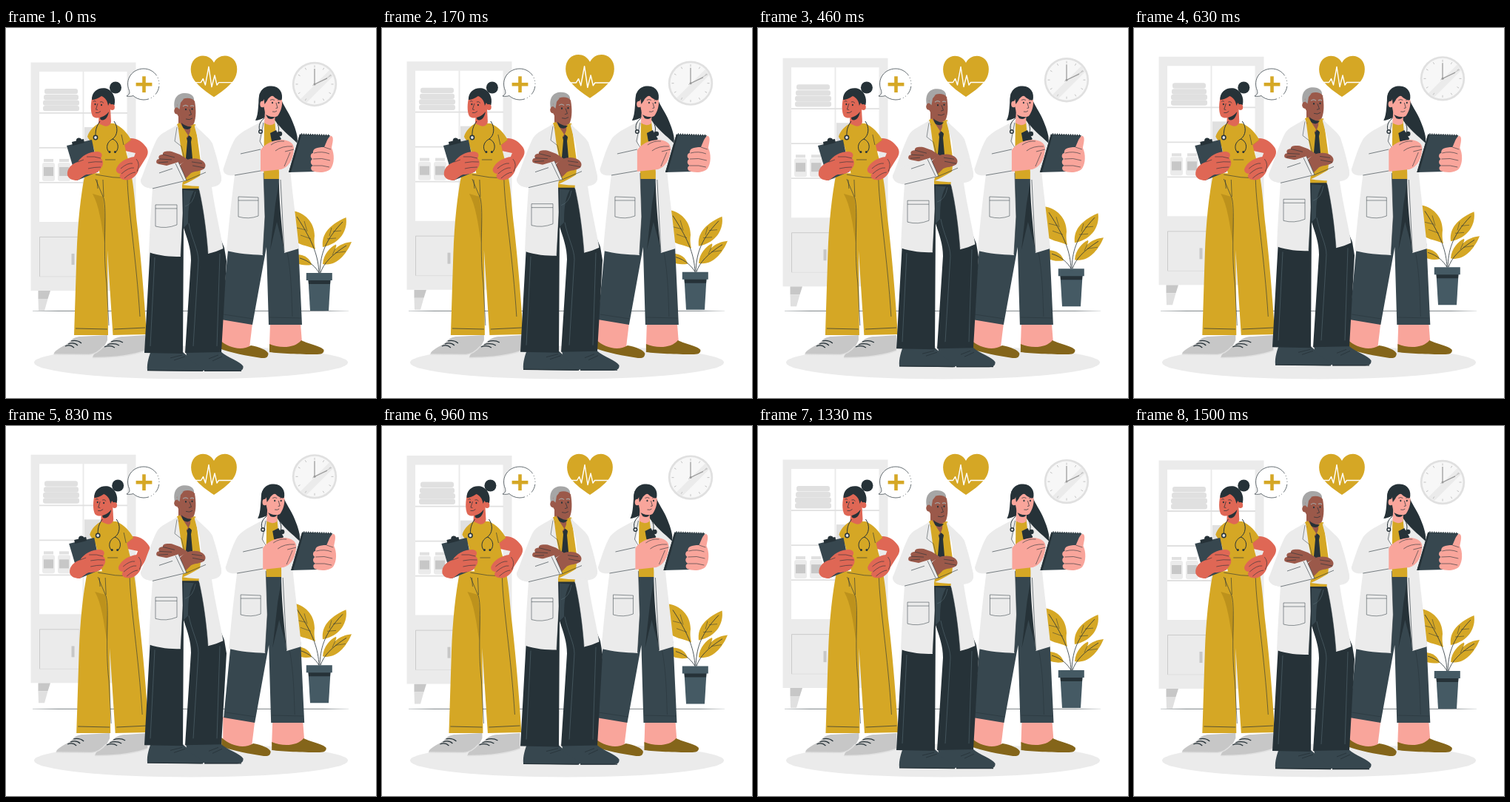
Write an HTML page with a canvas that moves like this. It is 500 px wide and 500 px high and loops after 1.54 s.

```html
<!DOCTYPE html>
<html lang="en">
<head>
<meta charset="utf-8">
<title>Medical team</title>
<style>
html, body { margin: 0; width: 100%; height: 100%; overflow: hidden; background: #fff; }
canvas { display: block; width: 100vw; height: 100vh; }
</style>
</head>
<body>
<canvas id="stage"></canvas>
<script>
const canvas = document.getElementById('stage');
const ctx = canvas.getContext('2d');
const ratio = Math.max(1, window.devicePixelRatio || 1);
canvas.width = canvas.height = 500 * ratio;

const LOOP = 1540, STEPS = 37;
const INK = '#263238', SLATE = '#37474f', STEEL = '#455a64';
const GOLD = '#d5a725', AMBER = '#bd921c', BROWN = '#84651a';
const PALE = '#ebebeb', MIST = '#e0e0e0', GREY = '#c7c7c7', WHITE = '#fff';
const CORAL = '#df6755', CLAY = '#9b594a', PINK = '#f9a59b', SILVER = '#a6a6a6';

function fill(color, d) {
  ctx.fillStyle = color;
  ctx.fill(new Path2D(d));
}
function line(d, width = 0.8, color = INK) {
  ctx.strokeStyle = color;
  ctx.lineWidth = width;
  ctx.stroke(new Path2D(d));
}
function box(color, x, y, w, h, r = 0) {
  ctx.fillStyle = color;
  ctx.beginPath();
  ctx.roundRect(x, y, w, h, r);
  ctx.fill();
}
function oval(color, x, y, rx, ry = rx) {
  ctx.fillStyle = color;
  ctx.beginPath();
  ctx.ellipse(x, y, rx, ry, 0, 0, 7);
  ctx.fill();
}
function shifted(dx, dy, draw) {
  ctx.save();
  ctx.translate(dx, dy);
  draw();
  ctx.restore();
}

// Timing
function snappy(x) {
  let lo = 0, hi = 1;
  const curve = (s, a, b) => 3 * (1 - s) ** 2 * s * a + 3 * (1 - s) * s * s * b + s ** 3;
  for (let i = 0; i < 18; i++) {
    const mid = (lo + hi) / 2;
    if (curve(mid, 0.36, 0.19) < x) lo = mid; else hi = mid;
  }
  return curve(lo, 0.07, 0.97);
}
function shake(p) {
  const stops = [0, -1, 2, -4, 4, -4, 4, -4, 2, -1, 0, 0];
  const i = Math.min(9, Math.floor(p * 10));
  return 0.85 * (stops[i] + (stops[i + 1] - stops[i]) * snappy(p * 10 - i));
}
const beat = p => 1 + 0.07 * Math.max(0, 1 - Math.abs(p / 0.15 - 1));
const float = p => 4 * (Math.cos(p * 2 * Math.PI) - 1);

function floor() {
  oval(PALE, 250, 452, 212, 22.5);
  const fade = ctx.createLinearGradient(36, 0, 463, 0);
  fade.addColorStop(0, '#26323866');
  fade.addColorStop(0.08, INK);
  fade.addColorStop(0.92, INK);
  fade.addColorStop(1, '#26323833');
  line('M36 382.4H463', 0.6, fade);
}

function cabinet() {
  fill(GREY, 'M43.5 355H60L56.5 366H43.5Z');
  fill(MIST, 'M43.5 366H56.5L52 382H44Z');
  box(PALE, 33.5, 46.5, 142, 308.5);
  box(WHITE, 45, 59, 58.5, 203);
  box(WHITE, 105.5, 59, 58, 203);
  for (const y of [115, 162, 209]) line(`M45 ${y}H164`, 1.8, MIST);
  [[52, 82, 45], [51, 90, 47], [50, 97.5, 49], [50, 105, 49]].forEach(([x, y, w]) => box(MIST, x, y, w, 7.4, 3));
  box(MIST, 106, 134, 23, 27);
  for (const x of [49, 70]) {
    box(MIST, x + 2, 177, 13, 4);
    box(PALE, x, 182, 17, 25, 3);
    box(GREY, x + 2, 188, 13, 12);
  }
  line('M45.5 336V282.5H99', 0.7, '#bdbdbd');
  line('M45.5 336H99V282.5', 0.7, '#d8d8d8');
  box(GREY, 88.5, 305, 4, 15);
}

function clock() {
  const x = 417, y = 76;
  oval(MIST, x, y, 30.2);
  oval('#f7f7f7', x, y, 27.5);
  fill(PALE, 'M398 96L437 57L442 65L406 101Z');
  ctx.strokeStyle = '#bdbdbd';
  ctx.lineWidth = 0.9;
  for (let i = 0; i < 12; i++) {
    const c = Math.cos(i * Math.PI / 6), s = Math.sin(i * Math.PI / 6);
    ctx.beginPath();
    ctx.moveTo(x + 22.5 * c, y + 22.5 * s);
    ctx.lineTo(x + 25.5 * c, y + 25.5 * s);
    ctx.stroke();
  }
  line('M417 76V55M417 76L434 68', 1.1, '#8f8f8f');
  line('M414 78L440 64', 0.6, '#aaa');
  oval('#999', x, y, 1.5);
}

function plant() {
  fill(GOLD, 'M428 296C426 281 434 267 459.5 256C462 272 453 291 428 296Z');
  fill(GOLD, 'M428 319C429 306 438 296 446 292.5C447 295 446 297 443.5 300C451 292 459 290 467 289C461 304 447 323 428 319Z');
  fill(GOLD, 'M387 247C403 249 417 262 417 281C416 289 417 294 418 299C405 293 395 294 388 285Z');
  fill(GOLD, 'M392 306C404 306 411 312 413 320C406 321 398 321 392 317Z');
  line('M423 331C422 310 416 290 393 255M424 331C425 310 428 290 455 262M425 331C429 318 441 306 460 294M423 331C419 324 411 315 397 311', 0.8);
  line('M407 275L403 261M412 285L398 280M405 273L393 270M437 281L440 270M442 275L453 274M434 285L446 284M445 304L459 302M441 307L445 298', 0.5);
  fill(STEEL, 'M408.5 340H438.5L436 382H411Z');
  fill(INK, 'M408.5 340H438.5L438 346H409Z');
  box(STEEL, 405.8, 331, 35, 10);
}

function heart(scale) {
  ctx.save();
  ctx.translate(281, 66);
  ctx.scale(scale, scale);
  ctx.translate(-281, -66);
  fill(GOLD, 'M281 47C275 36 262 35.5 255 42.5C248.5 49 248.5 62 255 71C262 80 272 87 281 93C290 87 300 80 307 71C313.5 62 313.5 49 307 42.5C300 35.5 287 36 281 47Z');
  line('M254 73.5H263.5L266.5 68.5L269.5 77L274 52.5L278 79.5L282 64L285 77L287.5 73.5H306', 1.4, WHITE);
  ctx.restore();
}

function bubble() {
  const shape = 'M163 92C168 89 167 87 166.5 84.5C160 69 171 55 186 55C198 55 207 64.5 207 76C207 87.5 198 97 186 97C180 97 175 94.5 172 91.5C169 92.5 166 92.5 163 92Z';
  fill(WHITE, shape);
  ctx.setLineDash([72, 3, 1, 3, 1, 3, 1, 3, 12, 3, 1, 3, 1, 3, 50, 0]);
  line(shape, 0.7);
  ctx.setLineDash([]);
  box(GOLD, 184.2, 65.3, 4.6, 21.8);
  box(GOLD, 175.6, 73.9, 21.8, 4.6);
}

function nurse() {
  // Shoes
  fill(GREY, 'M64.5 441C65 435 77 431 85 425C90 419 95 417 101 417L137 415L137 422C132 433 126 440 112 441.5Z');
  fill(GREY, 'M117 445C118 438 131 432 140 425C147 418 153 417 159 417L188 415L188 436C176 441 150 446 117 445.5Z');
  line('M64.5 441L112 441.5C121 441 127 436 132 430M117 445.5C150 446 176 441 188 436', 1.4, MIST);
  line('M84 427Q92 424 97 429M88 423Q96 421 102 426M80 430Q87 427 92 432M137 428Q146 425 153 429M142 424Q151 421 158 425M133 431Q141 428 147 432', 1.2);

  // Trousers
  fill(GOLD, 'M107 196C101 225 97 262 95.5 305L92 415L138 415L137 300L144.5 415L190 414C187 365 182 305 176.5 260C174 235 173 215 169 197Z');
  fill(AMBER, 'M117 224L131 228C134 250 135 270 133 290C129 265 126 240 117 224Z');
  line('M121 204L132 230C137 250 130 295 136 345L139 402M132 228L131 205M123 205L124 217M164 205C165 245 176 310 181 390', 0.6);
  line('M94 406L137 407M146 407L188 405', 0.7);

  // Resting arm
  fill(CORAL, 'M158 152C170 146 180 150 187 158C192 163 193 168 190 174L180 190L168 187L175 169L161 166Z');

  // Tunic
  fill(GOLD, 'M127 128C119 132 112 139 110 147L118 160L127 198L169 201C170 190 165 180 162 166L160 158L169 151C164 142 157 134 146 129Z');
  line('M159 158L156 144M121 198Q144 203 168 203M134 178H148', 0.6);
  line('M169 151L160 158', 0.6, AMBER);

  // Head
  fill(CORAL, 'M126 112L141 108L142 126C142 131 137 134 132 132L125 129Z');
  fill(INK, 'M126 119C131 121 135 118 139 113C138 120 134 126 128 124Z');
  oval(INK, 148, 80.5, 8);
  fill(CORAL, 'M117 92C114 102 114 113 117 119C122 124 130 121 134 117C139 112 143 105 143 96C138 88 124 86 117 92Z');
  fill(INK, 'M116 97C115.5 86 125 79.5 135 81.5C144 84 149 94 146.5 104L143 105L140 101L138 105C137 98 134 94 129 92C124 95.5 120 97 116 97Z');
  oval(CORAL, 143.5, 107, 3.4, 4);
  oval(INK, 120.5, 103, 1, 1.3);
  oval(INK, 129, 104, 1, 1.3);
  line('M118 99.5Q119.5 97.5 121.5 99.5M127 100Q130 98.5 132 101.5M124 102L121.5 110L124 110.5M121 114.5Q125 115.5 128 112.5', 0.7);

  // Stethoscope
  line('M127 126C122 133 121 138 121 145M146 126C152 134 151 145 144 150C136 154 135 162 138.5 167M144 150C152 153 153 162 149 167', 1);
  oval(INK, 121, 148, 3.4);
  oval(MIST, 121, 148, 1.9);
  oval(INK, 140, 167.5, 1.5);
  oval(INK, 147.5, 167.5, 1.5);

  // Hand on hip
  fill(CORAL, 'M149 190C153 181 163 175 174 174C181 179 182 187 178 195C174 202 167 207 159 205C154 204 152 200 155 197C151 197 148 194 149 190Z');
  line('M155 190Q164 182 171 183M156 197Q166 188 173 189M160 203Q169 195 175 195M176 177Q182 184 177 194', 0.6);

  // Clipboard
  fill(SLATE, 'M82 159L116 151L125 194L96 206Z');
  fill(INK, 'M90 159L89 154L95 152.5C94 148 101 147 102 150.5L105 150L106 155Z');
  fill(CORAL, 'M83 199C82 190 88 184 97 181C102 173 112 167 124 167C130 168 131 172 128 176C132 179 132 185 128 190C125 196 117 198 109 198C103 200 101 204 96 206C90 206 85 204 83 199Z');
  line('M109 174Q120 173 128 176M111 182Q121 180 130 181M111 190Q119 188 128 188M97 181L105 178', 0.6);
}

function pharmacist() {
  // Legs and shoes
  fill(PINK, 'M290 393L333 399L329 432C319 440 302 433 290 425Z');
  fill(PINK, 'M357 399H398L400 425C388 435 367 434 356 430Z');
  fill(BROWN, 'M288 421C300 432 318 437 331 429C342 431 353 435 354.5 440C354 445 352 446.5 345 446C325 443 305 439 288 433Z');
  fill(BROWN, 'M356 427C370 433 390 433 399 422C409 427 426 430 429.5 435C430 440 426 441 418 441C398 441 370 440 356 438Z');
  fill(SLATE, 'M301 290L291 394L333 401L352 296L355 401L400 401L395 292L369 203H348Z');
  fill(INK, 'M369 208L377 303L366 262L357 300L364 238Z');
  line('M294 387L334 393M356 391L399 392M380 302C386 335 386 365 387 390', 0.5);

  // Sleeve and shirt
  fill(PALE, 'M364 127C377 128 391 139 398 152L385 190L380 180Z');
  fill(GOLD, 'M349 127L364 124L370 204H348Z');

  // Coat
  fill(PALE, 'M350 124C334 133 318 139 310 149C303 160 298 178 293.5 191C294 198 300 200 309 199C305 230 301 265 298 301C314 305 330 306 347 307L350 255L348 190L345 155Z');
  fill(PALE, 'M363 124L375 150L384 190C387 225 393 265 396 298L376 304C373 270 368 230 369 195L366 155Z');
  line('M348 128L343 153L350 165M344 193L309 199M317 170L344 164M348 196L350 255L347 306M371 205L376 303', 0.6);
  line('M314 228L341 229L341 254Q328 259 314 255ZM314 233H341', 0.5);

  // Head
  fill(INK, 'M343 88C340 104 342 115 337 125C346 124 352 118 361 121C371 137 384 146 393.5 155.5C395 148 392 138 387 126C382 113 374 104 372 96Z');
  fill(PINK, 'M350 112L364 114L363 129Q356 134 349 128Z');
  fill(INK, 'M351 117C356 120 361 121 364 119Q361 125 354 122Z');
  fill(INK, 'M342 101C340 86 348 78 359 78.5C370 79 375 88 372.5 98C367 95 360 93 355 91L348 104Z');
  fill(PINK, 'M347 99C351 92 356 90 361 92C365 96 369 98 373 97C374 105 371 114 367 119C361 122 354 119 350 114Z');
  oval(PINK, 346.5, 103, 3.2, 4.2);
  fill(INK, 'M350 90C348 95 349 99 349.5 103L353 98C354 95 358 92 361 91Z');
  oval(INK, 360, 101, 1, 1.3);
  oval(INK, 368.5, 101, 1, 1.3);
  line('M357 97.5Q360 95.5 363 97.5M367 97.5Q369 96 371 97.5M365 101L367 108L364.5 108.5M360 113Q364 114 366 112', 0.7);

  // Stethoscope
  line('M349 122C341 128 341 135 344 142M364 124C370 133 370 140 365 146', 1);
  oval(INK, 344, 140, 3);
  oval(MIST, 344, 140, 1.6);
  fill(INK, 'M357 142L365 138L372 150L365 156L359 153Z');

  // Hands and notebook
  fill(PINK, 'M344 165C350 156 360 152 372 151C382 151 390 156 389 164C388 178 382 188 372 191L344 194Z');
  oval(INK, 370, 143, 3.2);
  line('M358 158Q366 152 376 153M364 166Q373 159 387 160M389 164L377 167M384 168L376 187', 0.6);
  fill(SLATE, 'M397 143.5L438 145L419 194L382 195Z');
  fill(INK, 'M397 143.5L399 145L385 195H382Z');
  ctx.setLineDash([1.2, 1.8]);
  line('M399 143.5L437 145', 2.4);
  ctx.setLineDash([]);
  fill(PINK, 'M439 145.5C444 147 441 156 440 162C444 170 444 183 439 190C434 196 421 196 414 193C411 190 412 187 415 186C411 184 411 179 414 177C410 174 412 169 415 169C414 163 420 161 430 161C433 155 434 149 439 145.5Z');
  line('M416 169Q427 166 437 170M415 177Q427 175 438 179M415 186Q428 185 437 188M430 161L439 164', 0.6);
}

function doctor() {
  // Shoes
  fill(SLATE, 'M191 463C190 452 194 442 196 436L239 438C247 446 263 452 269 459C269 463 266 464 262 464Z');
  fill(SLATE, 'M243 438L290 437C300 446 316 450 320.5 457C321 462 318 464 310 464H269C262 456 252 452 245 446Z');
  line('M191 462.7L266 463.5M268 463.5H318', 1.3);
  line('M222 446L238 442M227 449L242 444M274 447L287 442M279 450L292 444', 0.8);

  // Trousers
  fill(INK, 'M195 295L187 439L239 440L240 270C245 285 250 298 250 314L242 439L291 438L298 315L295 297L262 216H236V290Z');
  fill(SLATE, 'M240 219L254 220C246 233 246 252 246 264L240 270Z');
  line('M247 264C251 285 260 300 260 314L253 430M201 310L195 430M289 305L285 430M242 241Q253 238 256 221', 0.6, '#566a73');

  // Shirt and tie
  fill(GOLD, 'M231 130L256 130L268 217H236Z');
  fill(INK, 'M243.5 146L249 144L251 149L250 154L252.5 182L247 186L243 176L245 153Z');

  // Coat
  fill(PALE, 'M232 130C222 138 208 141 203 152C196 167 189 187 182 206C182 212 188 216 198 217C196 245 194 275 193 303C207 308 222 309 236 309L239 250L238 213L242 190L236 160Z');
  fill(PALE, 'M254 130C262 139 275 148 279 156C284 172 289 188 291 205C290 212 285 214 278 215C282 243 289 272 293.5 298C287 301 281 303 273 305C271 276 267 245 260.5 217L264 180L262 160Z');
  line('M231 134L228 153L237 160L242 180M239 217V255L236 308M261 219C267 245 271 278 273 304', 0.5);
  line('M202 239L231 239L231 266Q216 272 202 268ZM202 244H231', 0.5);

  // Crossed arms
  fill(CLAY, 'M204 183C202 180 204 177 207 177C205 173 208 171 212 171C211 167 217 166 224 167L235 171L246 178L225 190C217 184 212 186 204 183Z');
  fill(PALE, 'M182 206C183 196 205 190 233 181L244 206C226 212 212 217 198 217C188 216 183 213 182 206Z');
  fill(PALE, 'M239 212C252 206 268 198 284 181C288 190 292 199 291 206C289 214 265 216 239 212Z');
  fill(CLAY, 'M235 186C241 178 251 175 260 177C268 179 272 185 268 190C262 194 256 193 250 196L243 203Z');
  line('M207 177L224 178M212 171L228 175M206 182L219 181M251 181L265 183M252 186L268 189', 0.6);
  line('M233 181L244 206L198 217M229 183L240 206M244 206L270 195M207 196L225 190', 0.6);

  // Head
  fill(CLAY, 'M233 116L250 120L249 142L245 149L233 136Z');
  fill(INK, 'M237 128C241 132 247 134 251 133Q247 140 239 135Z');
  fill(GOLD, 'M231 130L235 128L246 145L241 153ZM250 137L255 130L254 150L247 145Z');
  fill(SILVER, 'M228 110C225 96 231 88 242 88C250 88 255 92 254 99L235 113Z');
  fill(CLAY, 'M231 104L235 98C240 94 251 93 255 99C257 110 257 121 254 129C250 135 242 132 237 127L231 116Z');
  oval(CLAY, 231, 112, 3.8, 4.6);
  fill(SILVER, 'M231 107L234.5 110L236 101L240 96L232 96Z');
  oval(INK, 243, 110, 1, 1.3);
  oval(INK, 251.5, 109.5, 1, 1.3);
  line('M239 106Q243 103 246 106M249 105.5Q252 104 254 106', 1.2, SILVER);
  line('M248 110L250.5 117L247 118M243 123Q248 125 252 122', 0.7);
}

function draw(now) {
  const step = Math.min(STEPS - 1, Math.floor((now % LOOP) / LOOP * STEPS + 0.12));
  const p = (step + 1) / STEPS;
  const rise = float(p), sway = shake(p) + 0.3;
  ctx.setTransform(ratio, 0, 0, ratio, 0, 0);
  ctx.lineCap = 'butt';
  ctx.lineJoin = 'round';
  ctx.fillStyle = WHITE;
  ctx.fillRect(0, 0, 500, 500);
  floor();
  shifted(0, rise, cabinet);
  shifted(0, rise, clock);
  shifted(0, rise, plant);
  heart(beat(p));
  bubble();
  shifted(sway, 0, nurse);
  shifted(sway, 0, pharmacist);
  shifted(0, rise, doctor);
}

const start = performance.now();
function tick() {
  draw(performance.now() - start);
  requestAnimationFrame(tick);
}
tick();
</script>
</body>
</html>
```
